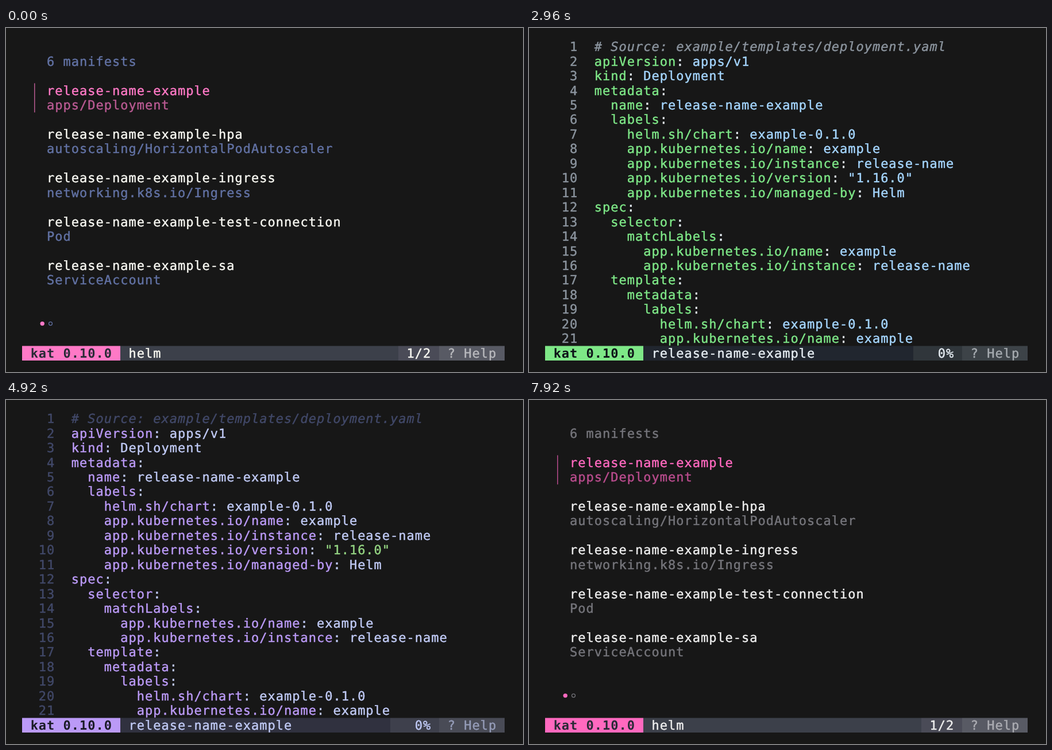
Write an HTML page with a canvas that moves like this. It is 900 by 600 pixels and loops after 8000 ms.

```html
<!DOCTYPE html>
<html lang="en">
<head>
<meta charset="utf-8">
<title>Manifest viewer themes</title>
<style>
  html, body { margin: 0; width: 100%; height: 100%; overflow: hidden; background: #171717; }
  canvas { display: block; width: 900px; height: 600px; }
</style>
</head>
<body>
<canvas id="stage" width="900" height="600"></canvas>
<script>
const ctx = document.getElementById('stage').getContext('2d');
const LOOP = 8000;
const LEFT = 28, TOP = 20, CELL = 840 / 59, ROW = 560 / 22;
const INSET = 0.4, BASE = 20.2;
const FONT = '22px "DejaVu Sans Mono", monospace';

const pink = {
  accent: '#ff79c6', dim: '#b95a92', text: '#f8f8f2', subtle: '#6272a4', string: '#c3f3a0',
  badge: '#282a36', bar: '#3c404a', pos: '#4a4b57', help: '#585a64', helpText: '#b8b9bd'
};
const green = {
  accent: '#7ee787', dim: '#5da865', text: '#e6edf3', subtle: '#8b949e', value: '#a5d6ff',
  comment: 'italic', badge: '#0d1117', bar: '#21262f', pos: '#30363b', help: '#3d4348', helpText: '#a6abb0'
};
const purple = {
  accent: '#bb9af7', dim: '#8a72b5', text: '#c0caf5', subtle: '#414868', string: '#94d482',
  comment: 'italic', badge: '#1a1b26', bar: '#30313f', pos: '#3e404c', help: '#494b56', helpText: '#959cb8'
};
const red = {
  accent: '#e06c75', dim: '#a75159', text: '#abb2bf', subtle: '#7f848e', string: '#98c379',
  badge: '#282c34', bar: '#3c404a', pos: '#484b54', help: '#53575c', helpText: '#868b94'
};
const magenta = {
  accent: '#ff69bf', dim: '#b94c8d', text: '#eeeeee', subtle: '#75757b', string: '#c3f3a0',
  badge: '#282a36', bar: '#3c404a', pos: '#4a4b57', help: '#585a64', helpText: '#abacb2'
};

const scenes = [
  [0, list, pink], [960, manifest, pink],
  [2000, list, green], [2960, manifest, green],
  [3960, list, purple], [4920, manifest, purple],
  [5960, list, red], [6920, manifest, red],
  [7920, list, magenta]
];

const items = [
  ['', 'apps/Deployment'],
  ['-hpa', 'autoscaling/HorizontalPodAutoscaler'],
  ['-ingress', 'networking.k8s.io/Ingress'],
  ['-test-connection', 'Pod'],
  ['-sa', 'ServiceAccount']
];

const yaml = `# Source: example/templates/deployment.yaml
apiVersion: apps/v1
kind: Deployment
metadata:
  name: release-name-example
  labels:
    helm.sh/chart: example-0.1.0
    app.kubernetes.io/name: example
    app.kubernetes.io/instance: release-name
    app.kubernetes.io/version: "1.16.0"
    app.kubernetes.io/managed-by: Helm
spec:
  selector:
    matchLabels:
      app.kubernetes.io/name: example
      app.kubernetes.io/instance: release-name
  template:
    metadata:
      labels:
        helm.sh/chart: example-0.1.0
        app.kubernetes.io/name: example`.split('\n');

const colX = col => LEFT + col * CELL;
const rowY = row => TOP + row * ROW;

// Each character sits in its own terminal cell; a hairline stroke adds weight.
function print(str, col, row, color, style = '') {
  ctx.font = `${style} ${FONT}`;
  ctx.textRendering = 'geometricPrecision';
  ctx.fillStyle = ctx.strokeStyle = color;
  ctx.lineWidth = 0.45;
  ctx.lineJoin = 'round';
  const y = Math.round(rowY(row) + BASE);
  [...str].forEach((ch, i) => {
    if (ch === ' ') return;
    const x = colX(col + i) + INSET;
    ctx.fillText(ch, x, y);
    if (style !== 'bold') ctx.strokeText(ch, x, y);
  });
}

function block(from, to, color) {
  const x = Math.round(colX(from));
  ctx.fillStyle = color;
  ctx.fillRect(x, rowY(21), Math.round(colX(to)) - x, ROW);
}

function statusBar(t, title, posCol, posText, posTextCol) {
  block(0, 12, t.accent);
  block(12, posCol, t.bar);
  block(posCol, 51, t.pos);
  block(51, 59, t.help);
  print('kat 0.10.0', 1, 21, t.badge, 'bold');
  print(title, 13, 21, t.text);
  print(posText, posTextCol, 21, t.text);
  print('? Help', 52, 21, t.helpText);
}

function dot(x, color, filled) {
  ctx.beginPath();
  ctx.arc(x, 515.6, filled ? 3.7 : 3, 0, Math.PI * 2);
  ctx.fillStyle = ctx.strokeStyle = color;
  ctx.lineWidth = 1.2;
  filled ? ctx.fill() : ctx.stroke();
}

function list(t) {
  print('6 manifests', 3, 1, t.subtle);
  items.forEach(([suffix, kind], i) => {
    const row = 3 + i * 3;
    print('release-name-example' + suffix, 3, row, i ? t.text : t.accent);
    print(kind, 3, row + 1, i ? t.subtle : t.dim);
  });
  ctx.fillStyle = t.dim;
  ctx.fillRect(49, rowY(3), 1.5, 2 * ROW);
  dot(63.2, t.accent, true);
  dot(77.5, t.subtle, false);
  statusBar(t, 'helm', 46, '1/2', 47);
}

function manifest(t) {
  yaml.forEach((line, row) => {
    print(String(row + 1).padStart(2), 2, row, t.subtle);
    if (line[0] === '#') {
      print(line, 6, row, t.subtle, t.comment);
      return;
    }
    const colon = line.indexOf(':');
    const value = line.slice(colon + 1);
    const plain = t.value || t.text;
    print(line.slice(0, colon), 6, row, t.accent);
    print(':', 6 + colon, row, t.text);
    print(value, 7 + colon, row, value.includes('"') ? t.string || plain : plain);
  });
  statusBar(t, 'release-name-example', 45, '0%', 48);
}

let shown;
const start = performance.now();

function frame() {
  const time = (performance.now() - start) % LOOP;
  const scene = scenes.findLast(([at]) => time >= at);
  if (scene !== shown) {
    shown = scene;
    ctx.fillStyle = '#171717';
    ctx.fillRect(0, 0, 900, 600);
    scene[1](scene[2]);
  }
  requestAnimationFrame(frame);
}
frame();
</script>
</body>
</html>
```
